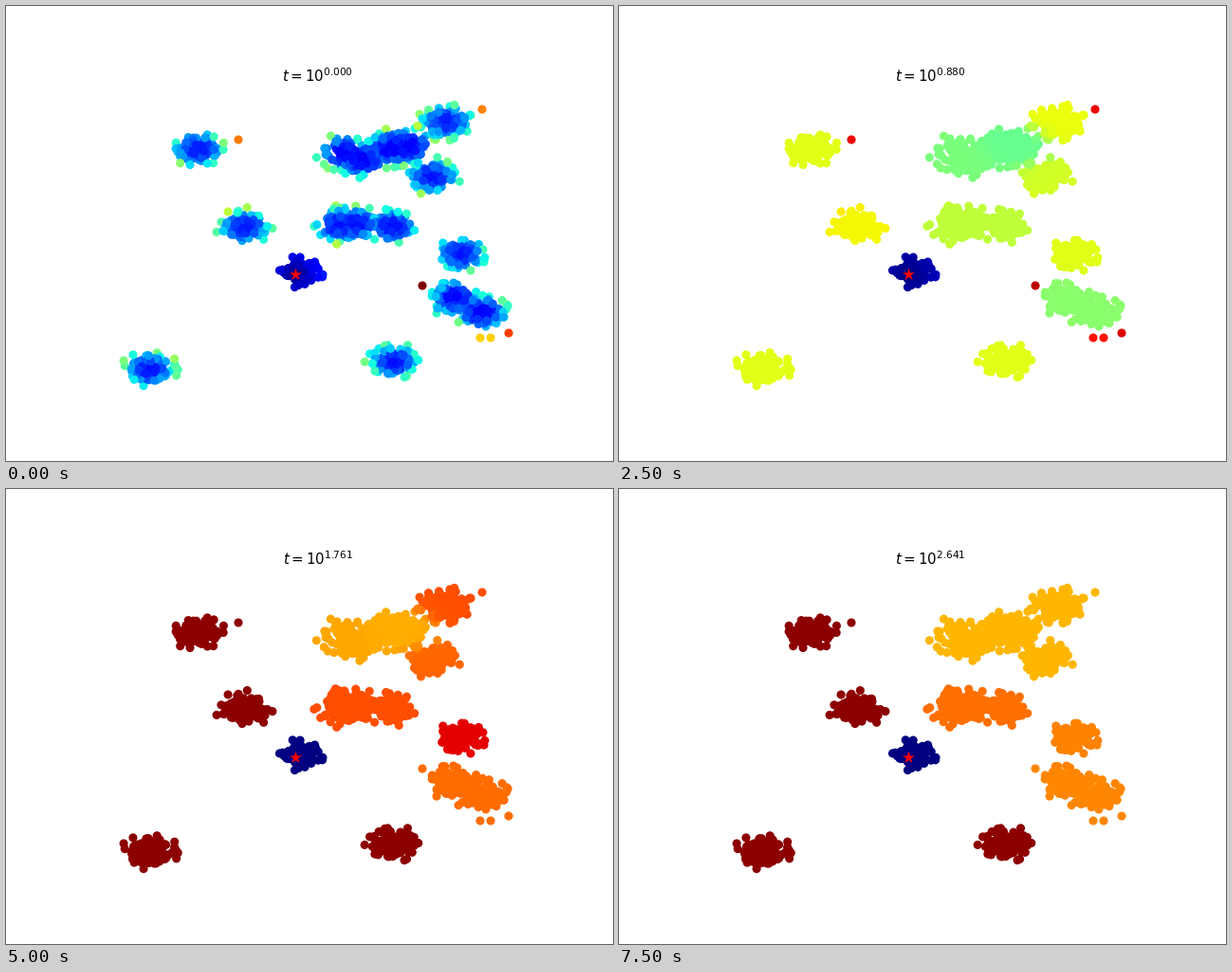
These frames come from a looping animation (640 by 480 pixels, 8 s). A matplotlib script:

```python
import numpy as np
import matplotlib.pyplot as plt
from matplotlib.animation import FuncAnimation

W, H, DPI = 640, 480, 100
FRAMES, INTERVAL = 16, 500
DOT, STAR = 43, 96
SPREAD = np.array([12.4, 8.2])
PER_CLOUD, CUTOFF = 100, 2.55
SOURCE = np.array([305, 283])
SETTLE, FINAL = 7, .715

# gain while rising, peak level, relaxation time, cloud centres
REGIONS = {
    "far":   (1.00, .985, np.inf, [(203, 151), (151, 383), (409, 375)]),
    "west":  (1.04, .985, np.inf, [(252, 233)]),
    "north": (0.80, .748, 3.6, [(358, 155), (376, 162)]),
    "ridge": (0.76, .732, 3.6, [(407, 150), (424, 148)]),
    "crown": (1.02, .935, 3.6, [(464, 122)]),
    "spur":  (0.97, .890, 3.6, [(449, 180)]),
    "mid":   (0.93, .833, 12, [(352, 231), (369, 230), (407, 232)]),
    "east":  (1.00, .955, 6.7, [(479, 262)]),
    "south": (0.83, .800, 12, [(474, 308), (502, 323)]),
}
HOME = (311, 281)
# isolated points: x, y, starting level
LONERS = np.array([(245, 141, .78), (502, 109, .77), (439, 295, 1),
                   (530, 345, .84), (500, 350, .69), (511, 350, .69)])

rng = np.random.default_rng(11)
steps = np.arange(FRAMES)


def cloud(centre, scale=1):
    """Gaussian cloud without its farthest tail."""
    u = rng.normal(size=(4 * PER_CLOUD, 2))
    u = u[np.hypot(*u.T) < CUTOFF][:PER_CLOUD]
    return centre + scale * SPREAD * u


def region_level(gain, peak, tau):
    """Grow until the peak is reached, then relax to the common level."""
    rise = gain * (.14 + .011 * steps ** 2.35)
    relax = np.exp(-(np.maximum(steps - SETTLE, 0) / tau) ** 2)
    return np.minimum(rise, FINAL + (peak - FINAL) * relax)


centres, curves = [], []
for gain, peak, tau, spots in REGIONS.values():
    for spot in spots:
        centres.append(spot)
        curves.append(region_level(gain, peak, tau))

clouds = np.vstack([cloud(c) for c in centres])
outer = np.vstack([clouds, LONERS[:, :2]])

# Neighbouring clouds blend by elliptical distance
q = np.linalg.norm((outer[:, None] - centres) / SPREAD, axis=2)
weight = np.exp(-.3 * q ** 2)
level = weight @ np.array(curves) / weight.sum(axis=1, keepdims=True)

# Sparse rims start hotter; the excess narrows and fades
excess = .05 * q.min(axis=1) ** 2.2 * rng.uniform(.75, 1.25, len(outer))
excess = np.minimum(excess, .5)[:, None]
gain = np.interp(steps, [0, 4, 6], [1, 2, 0])
value = level + gain * excess ** (1 + .18 * steps ** 2)

# Loners drift to a shared hot level before they join their region
early = steps < SETTLE
start = LONERS[:, 2:]
value[-len(LONERS):, early] = start + (.93 - start) * steps[early] / 6

# Around the star the level follows the distance and dies out
inner = cloud(HOME, .88)
dist = np.linalg.norm(inner - SOURCE, axis=1)[:, None]
value = np.vstack([value, .005 * dist * np.clip(1 - steps / 8, 0, 1)])
value = np.clip(value, 0, 1)
xy = np.vstack([outer, inner])

fig = plt.figure(figsize=(W / DPI, H / DPI), dpi=DPI, facecolor="white")
ax = fig.add_axes([0, 0, 1, 1])
ax.set_xlim(0, W)
ax.set_ylim(H, 0)
ax.axis("off")

dots = ax.scatter(*xy.T, s=DOT, c=value[:, 0], cmap="jet", vmin=0, vmax=1,
                  linewidths=0)
ax.scatter(*SOURCE, s=STAR, c="red", marker="*", linewidths=0, zorder=3)
title = ax.text(328.5, 80, "", fontsize=10.8, ha="center", va="baseline",
                family="DejaVu Sans")


def draw(k):
    dots.set_array(value[:, k])
    title.set_text(f"$t = 10^{{{k * np.log10(1.5):.3f}}}$")
    return dots, title


anim = FuncAnimation(fig, draw, frames=FRAMES, interval=INTERVAL,
                     repeat=True, repeat_delay=0)
plt.show()
```
